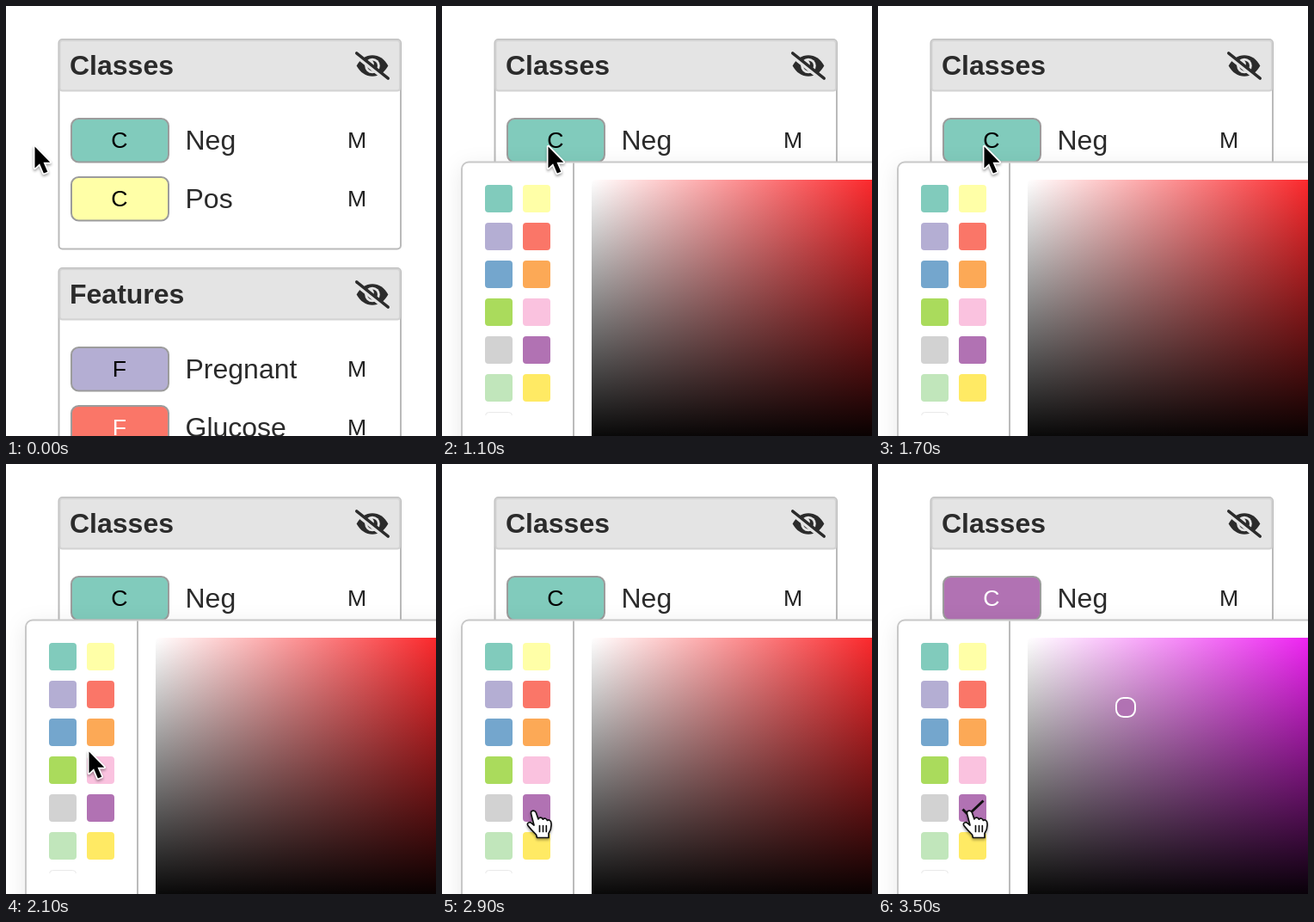
Write an HTML page that moves like this. It is 500 px wide and 500 px high and loops after 3600 ms.

```html
<!DOCTYPE html>
<html lang="en">
<head>
<meta charset="utf-8">
<title>Class colour picker</title>
<style>
  html, body { margin: 0; width: 100%; height: 100%; overflow: hidden; background: #fff; }
  svg { display: block; width: 500px; height: 500px; font-family: "Liberation Sans", Arial, sans-serif; }
  .title { font-size: 32px; font-weight: bold; fill: #2b2b2b; }
  .label { font-size: 32px; fill: #2b2b2b; }
  .key { font-size: 26.67px; text-anchor: middle; }
  .popup { filter: drop-shadow(0 6px 12px rgba(0, 0, 0, .09)); }
  .cursor { filter: drop-shadow(0 2px 1.5px rgba(0, 0, 0, .35)); }
</style>
</head>
<body>
<svg viewBox="0 0 500 500">
  <defs>
    <linearGradient id="sat">
      <stop offset="0" stop-color="#fff"/>
      <stop id="hue" offset="1" stop-color="#fb1519"/>
    </linearGradient>
    <linearGradient id="val" x2="0" y2="1">
      <stop offset="0" stop-color="#000" stop-opacity="0"/>
      <stop offset="1" stop-color="#000"/>
    </linearGradient>
    <clipPath id="fold"><rect x="40" y="460" width="100" height="16"/></clipPath>
    <g id="eye">
      <path d="M-18.4 0C-14 -8 -7.5 -12.2 0 -12.2S14 -8 18.4 0C14 8 7.5 12.2 0 12.2S-14 8 -18.4 0Z" fill="#2b2b2b"/>
      <circle r="8.8" fill="#e4e4e4"/>
      <path d="M0 -6A6 6 0 1 1 -5.8 1.6A4 4 0 0 0 0 -6Z" fill="#2b2b2b"/>
      <path d="M-19.5 -12L15.5 16" stroke="#e4e4e4" stroke-width="4.5"/>
      <path d="M-18.3 -14.6L18.3 14.6" stroke="#2b2b2b" stroke-width="3.4" stroke-linecap="round"/>
    </g>
  </defs>
  <g id="panels"></g>
  <g id="popup">
    <rect class="popup" x="23" y="181.5" width="540" height="400" rx="8" fill="#fff" stroke="#c8c8c8" stroke-width="2"/>
    <path d="M153 182.5V500" stroke="#bbb" stroke-width="2"/>
    <g id="swatches"></g>
    <rect x="50.5" y="472.5" width="31" height="31" rx="4" fill="none" stroke="#e9e9e9" clip-path="url(#fold)"/>
    <rect x="174" y="202" width="356" height="309" rx="5" fill="url(#sat)"/>
    <rect x="174" y="202" width="356" height="309" rx="5" fill="url(#val)"/>
    <g id="picked">
      <path d="M98.5 401.5L105 408L122.5 391.5" fill="none" stroke="#111" stroke-width="3"/>
      <rect x="277" y="272" width="22" height="22" rx="8.5" fill="#b172b3" stroke="#fff" stroke-width="2"/>
    </g>
  </g>
  <g id="cursor" class="cursor">
    <path id="arrow" d="M0 0V25L5.6 19.8L10.4 31L14.8 29.2L10 18.2H17.8Z" stroke="#fff" stroke-width="3.4" stroke-linejoin="round" paint-order="stroke"/>
    <g id="hand" stroke="#111" stroke-width="1.7" stroke-linecap="round" stroke-linejoin="round">
      <path fill="#fff" d="M-2.5 3C-3 -1 2 -1.6 3.4 2L6 9.5C7 7 10.5 7 11.4 9.7C13 7.8 15.6 8.6 16.4 11C18.3 9.6 21 11 21 14.5C21.4 19 20 23 18 26V31H4.5L3.5 27.5C0 24 -3 21 -6 17C-8 14 -4 12 -2 14L1 16.5Z"/>
      <path d="M7.5 17V24M11.5 17V24M15.3 17V24"/>
    </g>
  </g>
</svg>
<script>
const LOOP = 3600, STEP = 100;
const OPEN = 1000, PICK = 3100;
const COLORS = ['#81cbbc', '#ffffa7', '#b4aed3', '#fa7668', '#74a6cd', '#fca956',
  '#aadb5c', '#fac2df', '#d2d2d2', '#b172b3', '#c1e6bb', '#ffea64'];
// time, x, y of the pointer tip
const PATH = [[200, 33.5, 163.5], [800, 123.5, 163.5], [1700, 123.5, 163.5], [1800, 114, 186],
  [1900, 96, 244], [2000, 82.5, 304], [2100, 96.5, 334.5], [2200, 102, 365], [2400, 106, 403.5]];

const $ = id => document.getElementById(id);

function add(parent, name, attrs, text) {
  const el = document.createElementNS('http://www.w3.org/2000/svg', name);
  for (const k in attrs) el.setAttribute(k, attrs[k]);
  if (text) el.textContent = text;
  return parent.appendChild(el);
}

function panel(y, title, key, rows) {
  const g = add($('panels'), 'g', { transform: `translate(0 ${y})` });
  add(g, 'rect', { x: 61.5, y: 1, width: 397.5, height: 243.5, rx: 4, fill: '#fff', stroke: '#bababa', 'stroke-width': 2 });
  add(g, 'rect', { x: 62.5, y: 2, width: 395.5, height: 58.5, rx: 3, fill: '#e4e4e4', stroke: '#d2d2d2', 'stroke-width': 2 });
  add(g, 'text', { class: 'title', x: 74, y: 42 }, title);
  add(g, 'use', { href: '#eye', x: 426, y: 31.5 });
  return rows.map(([label, fill, ink], i) => {
    const row = add(g, 'g', { transform: `translate(0 ${68 * i})` });
    const box = add(row, 'rect', { x: 76, y: 93, width: 113, height: 50.5, rx: 8.5, fill, stroke: '#9c9c9c', 'stroke-width': 2 });
    const mark = add(row, 'text', { class: 'key', x: 132, y: 127, fill: ink }, key);
    add(row, 'text', { class: 'label', x: 208.5, y: 128.5 }, label);
    add(row, 'text', { class: 'key', x: 408, y: 127, fill: '#222' }, 'M');
    return { box, mark };
  });
}

const [neg] = panel(38, 'Classes', 'C', [['Neg', COLORS[0], '#000'], ['Pos', COLORS[1], '#000']]);
panel(304, 'Features', 'F', [['Pregnant', COLORS[2], '#000'], ['Glucose', COLORS[3], '#fff']]);

const spot = i => [50 + 44 * (i % 2), 208 + 44 * (i >> 1)];
COLORS.forEach((fill, i) => {
  const [x, y] = spot(i);
  add($('swatches'), 'rect', { x, y, width: 32, height: 32, rx: 4, fill });
});

function tipAt(t) {
  const n = PATH.findIndex(p => p[0] > t);
  if (n < 1) return (n ? PATH[PATH.length - 1] : PATH[0]).slice(1);
  const a = PATH[n - 1], b = PATH[n];
  let k = (t - a[0]) / (b[0] - a[0]);
  k = k * k * (3 - 2 * k);
  return [a[1] + (b[1] - a[1]) * k, a[2] + (b[2] - a[2]) * k];
}

const overSwatch = (x, y) => COLORS.some((_, i) => {
  const [sx, sy] = spot(i);
  return x >= sx && x <= sx + 32 && y >= sy && y <= sy + 32;
});

const show = (id, on) => $(id).setAttribute('visibility', on ? 'visible' : 'hidden');

function draw(t) {
  const open = t >= OPEN, picked = t >= PICK;
  const [x, y] = tipAt(t);
  const hand = open && overSwatch(x, y);
  show('popup', open);
  show('picked', picked);
  show('hand', hand);
  show('arrow', !hand);
  $('cursor').setAttribute('transform', `translate(${x} ${y})`);
  $('hue').setAttribute('stop-color', picked ? '#ec10f0' : '#fb1519');
  neg.box.setAttribute('fill', COLORS[picked ? 9 : 0]);
  neg.mark.setAttribute('fill', picked ? '#fff' : '#000');
}

const start = performance.now();
function tick() {
  const t = (performance.now() - start) % LOOP;
  draw(Math.floor(t / STEP) * STEP);
  requestAnimationFrame(tick);
}
tick();
</script>
</body>
</html>
```
